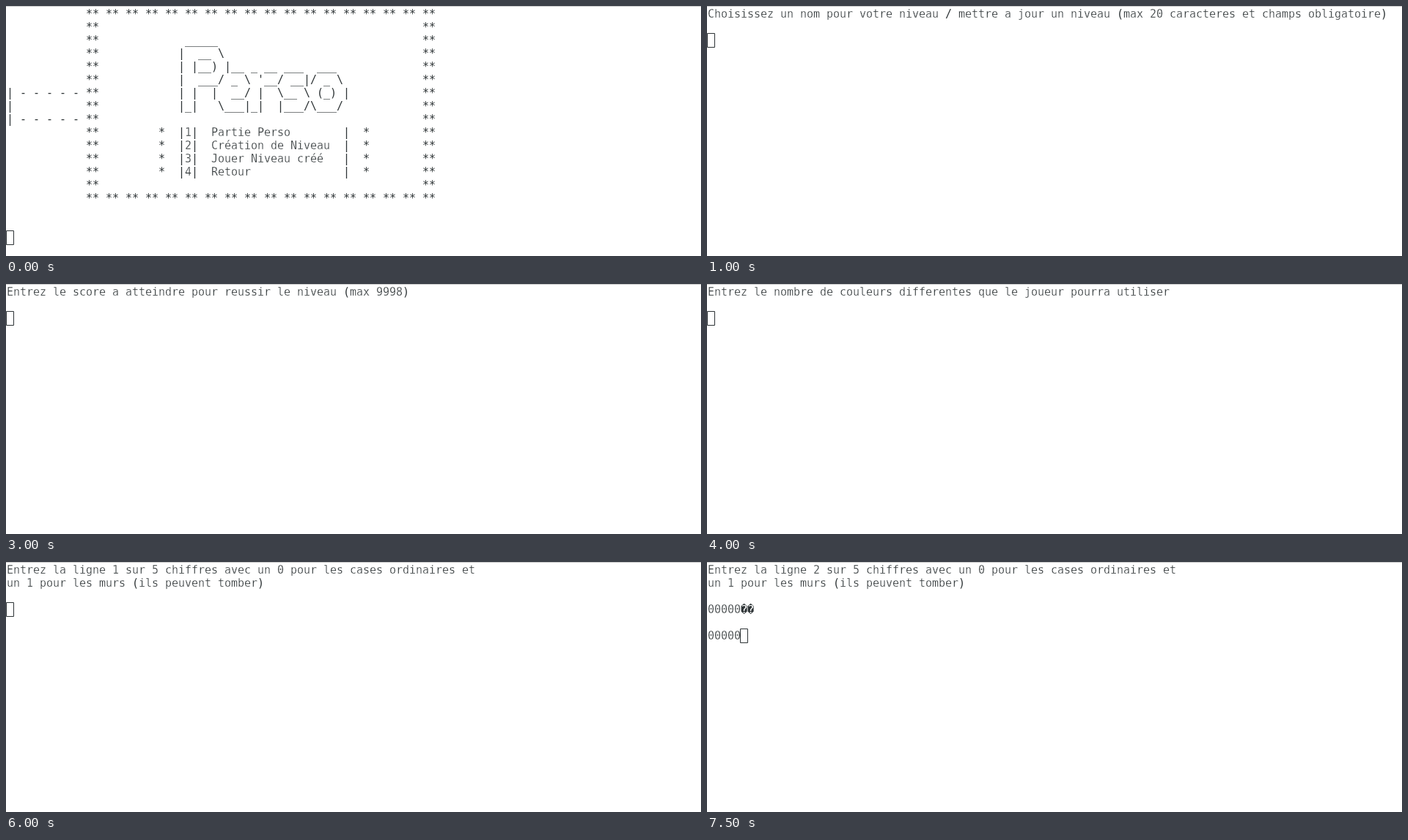
An HTML page with a canvas for the animation above (8000 ms loop, 948 by 342 pixels).

```html
<!DOCTYPE html>
<html lang="fr">
<head>
<meta charset="utf-8">
<title>Terminal</title>
<style>
html, body { margin: 0; height: 100%; overflow: hidden; background: #fff; }
canvas { display: block; }
</style>
</head>
<body>
<canvas id="stage" width="948" height="342"></canvas>
<script>
const ctx = document.getElementById('stage').getContext('2d');
const CELL_W = 9, CELL_H = 18, STEP = 500;
const INK = '#2e3436', PAPER = '#fff';

const logo = String.raw`
 _____
|  __ \
| |__) |__ _ __ ___  ___
|  ___/ _ \ '__/ __|/ _ \
| |  |  __/ |  \__ \ (_) |
|_|   \___|_|  |___/\___/`.split('\n').slice(1);
const choices = ['Partie Perso', 'Création de Niveau', 'Jouer Niveau créé', 'Retour'];

function menu() {
  const border = ' '.repeat(12) + '** '.repeat(18);
  const inner = Array(13).fill('');
  logo.forEach((line, i) => inner[i + 1] = ' '.repeat(12) + line);
  choices.forEach((name, i) =>
    inner[i + 8] = ' '.repeat(9) + `*  |${i + 1}|  ${name.padEnd(20)}|  *`);
  const left = { 5: '| - - - - -', 6: '|', 7: '| - - - - -' };
  const rows = inner.map((line, i) =>
    (left[i] || '').padEnd(12) + '**' + line.padEnd(49) + '**');
  return [border, ...rows, border, '', '', ''].join('\n');
}

const gridPrompt = n =>
  `Entrez la ligne ${n} sur 5 chiffres avec un 0 pour les cases ordinaires et\n` +
  'un 1 pour les murs (ils peuvent tomber)\n\n';

// Each screen waits one step, then shows the typed answer for one step.
const screens = [
  [menu(), '2'],
  ['Choisissez un nom pour votre niveau / mettre a jour un niveau (max 20 caracteres et champs obligatoire)\n\n', 'niveau_test'],
  ['Entrez la taille de la grille\n\n', '5'],
  ['Entrez le score a atteindre pour reussir le niveau (max 9998)\n\n', '500'],
  ['Entrez le nombre de couleurs differentes que le joueur pourra utiliser\n\n', '4'],
  ['Entrez le nombre de coups possibles\n\n', '20'],
  [gridPrompt(1), '00000'],
  [gridPrompt(2) + '00000\ufffd\ufffd\n\n', '00000']
];

function drawChar(char, col, row) {
  const x = 1 + col * CELL_W, y = 16 + row * CELL_H;
  ctx.fillText(char, x, y);
  // A paper-coloured outline slims letters and digits to one-pixel stems.
  if (/[\p{L}\p{N}]/u.test(char)) ctx.strokeText(char, x, y);
}

function draw(now) {
  const step = Math.floor(now / STEP) % (screens.length * 2);
  const [prompt, answer] = screens[step >> 1];
  const lines = (prompt + (step % 2 ? answer : '')).split('\n');

  ctx.fillStyle = PAPER;
  ctx.fillRect(0, 0, 948, 342);
  ctx.fillStyle = '#ccc';
  ctx.fillRect(0, 0, 948, 1);

  ctx.font = '15px "DejaVu Sans Mono", monospace';
  ctx.fillStyle = INK;
  ctx.strokeStyle = PAPER;
  ctx.lineWidth = .3;
  ctx.lineJoin = 'round';
  lines.forEach((line, row) =>
    [...line].forEach((char, col) => drawChar(char, col, row)));

  const row = lines.length - 1, col = lines[row].length;
  ctx.strokeStyle = INK;
  ctx.lineWidth = 1;
  ctx.strokeRect(col * CELL_W + .5, row * CELL_H + 1.5, 10, 19);
}

const start = performance.now();
(function tick() {
  draw(performance.now() - start);
  requestAnimationFrame(tick);
})();
</script>
</body>
</html>
```
